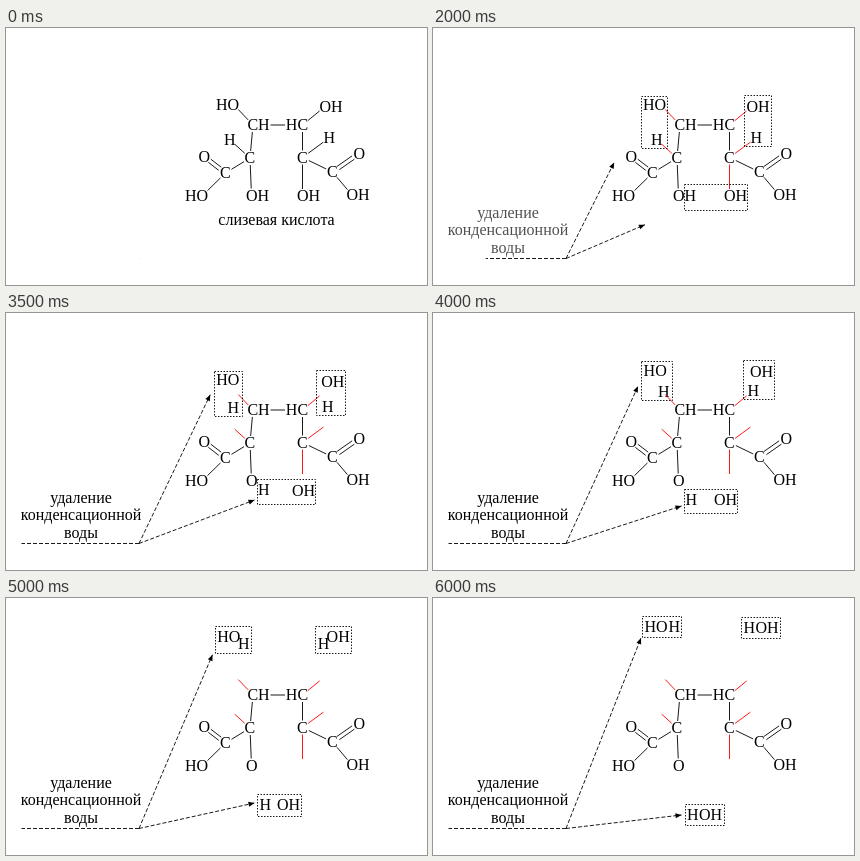
Write an HTML page that moves like this. It is 421 by 257 pixels and loops after 8000 ms.

```html
<!DOCTYPE html>
<html lang="ru">
<head>
<meta charset="utf-8">
<style>
html, body { margin: 0; width: 100%; height: 100%; overflow: hidden; background: #fff; }
svg { display: block; width: 421px; height: 257px; }
text { font: 16px "Liberation Serif", "Times New Roman", serif; text-anchor: middle; }
line { stroke: #000; stroke-width: 0.9; }
rect { fill: none; stroke: #000; stroke-width: 0.9; stroke-dasharray: 1.5 1.5; }
.dash { stroke-dasharray: 4 2; }
</style>
</head>
<body>
<svg id="stage" viewBox="0 0 421 257" xmlns="http://www.w3.org/2000/svg"></svg>
<script>
const STEP = 500, LOOP = 8000, LAST = 12;
const LETTER = 12, HALF = 5.6;
const stage = document.getElementById('stage');

function set(el, attrs) {
  for (const k in attrs) el.setAttribute(k, attrs[k]);
}
function add(tag, attrs = {}, content = '') {
  const el = document.createElementNS('http://www.w3.org/2000/svg', tag);
  set(el, attrs);
  el.textContent = content;
  return stage.appendChild(el);
}
const clamp = v => Math.max(0, Math.min(1, v));
const mix = (a, b, u) => a.map((v, i) => v + (b[i] - v) * u);

// An atom group is placed by the centre of the letter that carries the bond:
// the last letter of HO and HC, otherwise the first.
function atom(label, x, y) {
  const last = label === 'HO' || label === 'HC';
  const el = add('text', { style: `text-anchor:${last ? 'end' : 'start'}` }, label);
  const moveTo = (x, y) => set(el, { x: x + (last ? HALF : -HALF), y: y + 5 });
  moveTo(x, y);
  return { x, y, moveTo };
}

// A bond runs between two atoms, trimmed at both ends and shifted sideways.
function bond(a, b, { gap = 7, side = 0 } = {}) {
  const len = Math.hypot(b.x - a.x, b.y - a.y);
  const ux = (b.x - a.x) / len, uy = (b.y - a.y) / len;
  const ox = -uy * side, oy = ux * side;
  return add('line', {
    x1: a.x + ux * gap + ox, y1: a.y + uy * gap + oy,
    x2: b.x - ux * gap + ox, y2: b.y - uy * gap + oy
  });
}

const c1 = atom('C', 219.5, 145), c2 = atom('C', 244, 130), c3 = atom('CH', 247, 97);
const c4 = atom('HC', 296.5, 97), c5 = atom('C', 296.5, 129.5), c6 = atom('C', 326.5, 144);
const lowO = atom('O', 245.5, 167.5), lowH = atom('H', 257, 167.5);
const leftOH = atom('HO', 227.5, 76.5), leftH = atom('H', 223.5, 111.5);
const rightOH = atom('OH', 319, 78.5), rightH = atom('H', 323, 110);
const lowOH = atom('OH', 296.5, 168);

// Carbon chain and the two acid ends
bond(c3, c4, { gap: 17.5 });
[[c1, c2], [c2, c3], [c4, c5], [c5, c6], [c2, lowO],
 [c1, atom('HO', 196.5, 167.5)], [c6, atom('OH', 346, 167)]
].forEach(([a, b]) => bond(a, b));
for (const [c, o] of [[c1, atom('O', 198, 128.5)], [c6, atom('O', 353, 125.5)]])
  for (const side of [-2, 2]) bond(c, o, { side });

const breaking = [[c3, leftOH], [c2, leftH], [c4, rightOH], [c5, rightH], [c5, lowOH]]
  .map(([a, b]) => bond(a, b));

// Each water leaves as a hydroxyl and a hydrogen that meet at a common centre.
const waters = [
  { oh: leftOH, h: leftH, side: 1, centre: [229, 29], box: [208, 68, 234, 120] },
  { oh: rightOH, h: rightH, side: -1, centre: [328, 29.5], box: [311, 67, 338, 118] },
  { oh: lowOH, h: lowH, side: -1, centre: [271.5, 216.5], box: [251, 156, 314, 182] }
];
for (const w of waters) w.frame = add('rect');

function drawWater({ oh, h, side, centre: [x, y], box, frame }, move, mark) {
  oh.moveTo(...mix([oh.x, oh.y], [x, y], move));
  h.moveTo(...mix([h.x, h.y], [x + side * LETTER, y], move));
  const end = [x - 19.5, y - 10.5, x + 19.5, y + 10.5];
  const [l, t, r, b] = mix(box, end, move).map(v => Math.floor(v) + 0.5);
  set(frame, { x: l, y: t, width: r - l, height: b - t, opacity: mark });
}

const caption = add('text', { x: 270.5, y: 197 }, 'слизевая кислота');
const label = ['удаление', 'конденсационной', 'воды']
  .map((s, i) => add('text', { x: 75, y: 189.5 + 17.6 * i }, s));

const origin = [133, 230.5];
const underline = add('line', { class: 'dash' });
const arrows = [
  { from: [203.5, 90], to: [208, 40] },
  { from: [248.5, 181], to: [248.5, 217] }
];
for (const a of arrows) {
  a.shaft = add('line', { class: 'dash' });
  a.head = add('path', { d: 'M0 0L-6 -2.5V2.5Z' });
}

function drawArrow({ shaft, head, from, to }, grow, swing) {
  const [x, y] = mix(origin, mix(from, to, swing), grow);
  const angle = Math.atan2(y - origin[1], x - origin[0]) * 180 / Math.PI;
  set(shaft, { x1: origin[0], y1: origin[1], x2: x, y2: y });
  set(head, { transform: `translate(${x} ${y}) rotate(${angle})`, opacity: grow ? 1 : 0 });
}

function draw(step) {
  const mark = clamp(step / 3);
  const grow = clamp((step - 1.95) / 3);
  const move = clamp((step - 6) / 5);
  const swing = clamp((step - 6) / 6);

  breaking.forEach(el => el.style.stroke = `rgb(${255 * mark},0,0)`);
  caption.style.opacity = 1 - mark;
  label.forEach(el => el.style.opacity = grow);
  waters.forEach(w => drawWater(w, move, mark));
  set(underline, { x1: origin[0], y1: origin[1], x2: origin[0] - 117.5 * grow, y2: origin[1] });
  arrows.forEach(a => drawArrow(a, grow, swing));
}

const start = performance.now();
function tick() {
  const t = (performance.now() - start) % LOOP;
  draw(Math.min(LAST, Math.floor(t / STEP)));
  requestAnimationFrame(tick);
}
tick();
</script>
</body>
</html>
```
